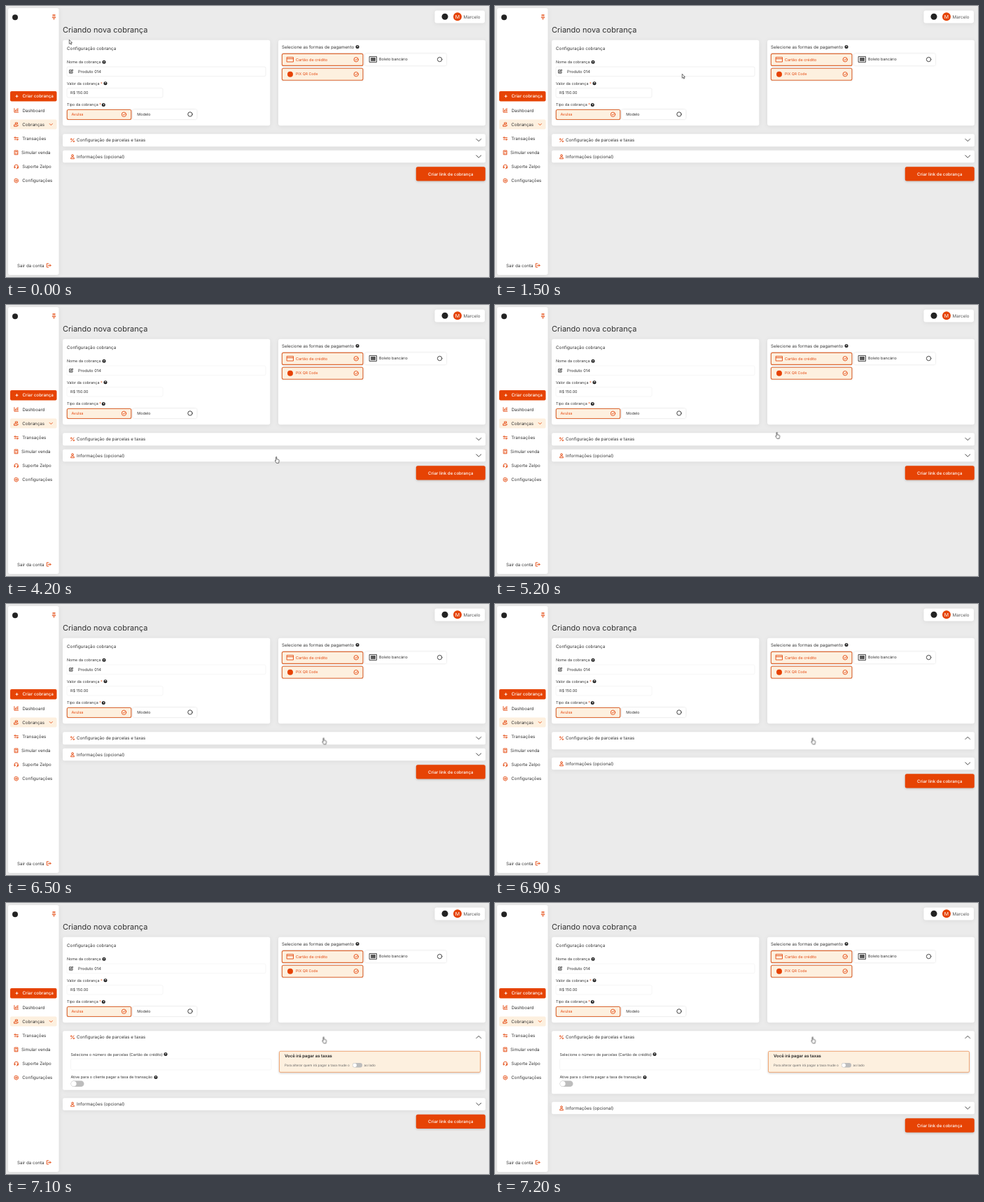
An HTML page for the animation above (8 s loop, 690 px wide and 388 px high).

```html
<!DOCTYPE html>
<html lang="pt-BR">
<head>
<meta charset="utf-8">
<title>Criando nova cobrança</title>
<style>
  html, body { margin: 0; width: 100%; height: 100%; overflow: hidden; background: #ebebeb; }
  svg { display: block; width: 690px; height: 388px; }
  text { font-family: Inter, "Open Sans", sans-serif; text-rendering: geometricPrecision; white-space: pre; }
  .card { fill: #fff; filter: drop-shadow(0 1px 3px rgba(0, 0, 0, .07)); }
  .field { fill: #fff; stroke: #ececec; stroke-width: .8; }
  .option { fill: #fff; filter: drop-shadow(0 .5px 1px rgba(0, 0, 0, .16)); }
  .picked { fill: #fdf0df; stroke: #df6a35; stroke-width: 1.1; filter: drop-shadow(0 .5px 1px rgba(0, 0, 0, .14)); }
  .line { fill: none; stroke: #e5490f; stroke-width: .9; stroke-linecap: round; stroke-linejoin: round; }
  .dark { stroke: #333; }
  .solid { fill: #e64304; }
  .button { filter: drop-shadow(0 1px 1.5px rgba(0, 0, 0, .2)); }
  .arrow path, .hand path { fill: #fff; stroke: #333; stroke-width: .7; stroke-linejoin: round; }
  .fade { animation: fade 8s step-end infinite; }
  .grow { animation: grow 8s step-end infinite; }
  .push { animation: push 8s step-end infinite; }
  .shut { animation: shut 8s step-end infinite; }
  .open { animation: open 8s step-end infinite; }
  .cursor { animation: cursor 8s step-end infinite; }
  .arrow { animation: arrow 8s step-end infinite; }
  .hand { animation: hand 8s step-end infinite; }
</style>
</head>
<body>
<script>
const LOOP = 8000, INK = '#333', ORANGE = '#e5490f';

// Each step is [start in ms, declarations], held until the next one.
const frames = (name, steps) =>
  `@keyframes ${name} {${steps.map(([ms, css]) => `${ms / LOOP * 100}% {${css}}`).join(' ')}}`;

// y is the middle of the capitals.
const text = (x, y, size, str, fill = INK, weight = 400) =>
  `<text x="${x}" y="${y + size * .36}" font-size="${size}" fill="${fill}" font-weight="${weight}">${str}</text>`;
const box = (cls, x, y, w, h, r = 2) =>
  `<rect class="${cls}" x="${x}" y="${y}" width="${w}" height="${h}" rx="${r}"/>`;
const line = (d, cls = '') => `<path class="line ${cls}" d="${d}"/>`;
const at = (x, y, body) => `<g transform="translate(${x} ${y})">${body}</g>`;
const dot = (x, y, r, fill) => `<circle cx="${x}" cy="${y}" r="${r}" fill="${fill}"/>`;
const ring = (x, y, r, cls = '') => `<circle class="line ${cls}" cx="${x}" cy="${y}" r="${r}"/>`;
const help = (x, y) => dot(x, y, 2.5, '#222') +
  `<text x="${x}" y="${y + 1.5}" font-size="4.2" font-weight="700" fill="#fff" text-anchor="middle">?</text>`;
const check = (x, y) => ring(x, y, 3.2) + at(x, y, line('M-1.4 0 L-.3 1.1 L1.5 -1'));
const label = (x, y, str, star = '') => text(x, y, 5.4, `${str}${star && `<tspan fill="${ORANGE}"> *</tspan>`}`);
const chevron = (x, y, dir, cls) => at(x, y, line(`M-3.4 ${-1.6 * dir} L0 ${1.6 * dir} L3.4 ${-1.6 * dir}`, cls));
const toggle = (x, y, w, h) => `<rect x="${x}" y="${y}" width="${w}" height="${h}" rx="${h / 2}" fill="#bdbdbd"/>` +
  dot(x + h / 2, y + h / 2, h / 2 - .5, '#fff');

const icons = {
  chart: 'M-2.8 -2.8 V2.8 H2.8 M-1.2 1.3 V-.3 M.5 1.3 V-1.8 M2.2 1.3 V-2.8',
  hand: 'M-2.8 .5 H-.5 L.8 1.4 H2.8 L1 2.8 H-2.8 Z M-1 -2.5 H1.8 V-.6 H-1 Z',
  swap: 'M-2.6 -1.3 H2.6 M-1.4 -2.5 L-2.6 -1.3 L-1.4 -.1 M2.6 1.4 H-2.6 M1.4 .2 L2.6 1.4 L1.4 2.6',
  calc: 'M-2.2 -2.9 H2.2 V2.9 H-2.2 Z M-1.1 -1.5 H1.1 M-1.1 .3 H-1 M1 .3 H1.1 M-1.1 1.6 H-1 M1 1.6 H1.1',
  phones: 'M-2.6 1.6 V-.2 A2.6 2.6 0 0 1 2.6 -.2 V1.6 M-2.6 .1 H-1.6 V1.8 H-2.6 M2.6 .1 H1.6 V1.8 H2.6 M2.6 1.8 L.4 2.9',
  gear: 'M0 -3 L2.6 -1.5 V1.5 L0 3 L-2.6 1.5 V-1.5 Z M1.1 0 A1.1 1.1 0 1 1 -1.1 0 A1.1 1.1 0 1 1 1.1 0',
  pin: 'M-1.6 -3.2 H1.6 M-1.1 -3.2 V-.8 L-2.4 .8 H2.4 L1.1 -.8 V-3.2 M0 .8 V3.4',
  exit: 'M-.4 -2.6 H-2.8 V2.6 H-.4 M-1 0 H3 M1.5 -1.6 L3 0 L1.5 1.6',
  percent: 'M-2 2.3 L2 -2.3 M-1 -1.6 A.8 .8 0 1 1 -2.6 -1.6 A.8 .8 0 1 1 -1 -1.6 M2.6 1.6 A.8 .8 0 1 1 1 1.6 A.8 .8 0 1 1 2.6 1.6',
  person: 'M1.4 -1.4 A1.4 1.4 0 1 1 -1.4 -1.4 A1.4 1.4 0 1 1 1.4 -1.4 M-2.5 2.8 A2.5 2.3 0 0 1 2.5 2.8 Z',
  edit: 'M.2 -2 H-2.4 V2.4 H2 V.2 M-.8 .9 L-.5 -.4 L2 -2.7 L2.8 -1.9 L.4 .6 Z',
  plus: 'M-2 0 H2 M0 -2 V2'
};
const icon = (name, x, y, cls) => at(x, y, line(icons[name], cls));

const menu = [
  ['chart', 'Dashboard', 23.5], ['hand', 'Cobranças', 23.3], ['swap', 'Transações', 23.3],
  ['calc', 'Simular venda', 22], ['phones', 'Suporte Zelpo', 23.3], ['gear', 'Configurações', 23.3]
];

const sidebar = box('card', 3, 3, 72.5, 382, 3) +
  dot(13, 16.3, 4, '#222') + icon('pin', 68.5, 16) +
  box('solid', 6, 122, 66.5, 14.5) + at(15.5, 129.2, `<path d="${icons.plus}" stroke="#fff" stroke-width=".9"/>`) +
  text(23.5, 129.2, 6.25, 'Criar cobrança', '#fff', 500) +
  `<rect x="6" y="162.5" width="66.5" height="14" rx="2" fill="#fdf0df"/>` +
  menu.map(([name, str, x], i) => icon(name, 14.7, 149.4 + i * 20.15) + text(x, 149.4 + i * 20.15, 6.2, str)).join('') +
  at(64.3, 169.6, line('M-2 -1 L0 1 L2 -1')) +
  text(16, 371.4, 6.2, 'Sair da conta') + icon('exit', 61, 371.4);

const header = box('card', 612.5, 6.5, 71.5, 18, 3) + dot(627, 15.3, 4.5, '#222') +
  dot(645, 15.3, 6, '#e64304') +
  '<text x="645" y="17.8" font-size="7" fill="#fff" text-anchor="middle">M</text>' +
  text(653.5, 15.4, 6.3, 'Marcelo', '#555') +
  text(81, 33.6, 11, 'Criando nova cobrança');

const setup = box('card', 81, 48.7, 296.3, 122.5, 3) +
  text(87, 61, 6.3, 'Configuração cobrança') +
  label(87, 80.2, 'Nome da cobrança') + help(140, 80.2) +
  `<g class="fade">${box('field', 87, 87, 284, 13.6)}${box('field', 87, 117.6, 137, 13.4)}</g>` +
  icon('edit', 93, 93.7, 'dark') + text(103, 93.6, 5.8, 'Produto 014') +
  label(87, 111, 'Valor da cobrança', '*') + help(142, 110.8) + text(92, 124.3, 5.45, 'R$ 150.00') +
  label(87, 141.5, 'Tipo da cobrança', '*') + help(139.3, 141.4) +
  box('picked', 87.3, 148.5, 91.5, 14) + text(93.5, 155.4, 5.4, 'Avulsa', ORANGE) + check(168.5, 155.3) +
  box('option', 181, 148.3, 91.5, 13.8) + text(187.3, 155.1, 5.45, 'Modelo') + ring(263, 155, 3.2, 'dark');

const payment = box('card', 389, 48.7, 296, 122.5, 3) +
  text(394, 58.7, 6.2, 'Selecione as formas de pagamento') + help(502, 58.6) +
  box('picked', 394.4, 68.4, 115.5, 17) + text(414, 76.7, 5.5, 'Cartão de crédito', ORANGE) + check(500.2, 76.7) +
  at(406, 76.7, line('M-4.5 -3.3 H4.5 V3.3 H-4.5 Z M-4.5 -1.2 H4.5')) +
  box('option', 513, 68.3, 116, 17) + text(533, 76.4, 5.5, 'Boleto bancário') + ring(619.6, 76.5, 3.2, 'dark') +
  at(524.5, 76.4, line('M-5 -4 H5 V4 H-5 Z', 'dark') + '<rect x="-3.4" y="-2.5" width="6.8" height="5" fill="#555"/>') +
  box('picked', 394.4, 89.2, 115.5, 17) + text(414, 97.6, 5.2, 'PIX QR Code', ORANGE) + check(500.2, 97.7) +
  dot(406, 97.7, 4, '#e64304');

const fees = '<rect class="card grow" x="81" y="183.3" width="604" height="18" rx="2.5"/>' +
  icon('percent', 95, 192.2) + text(101, 192.2, 6.2, 'Configuração de parcelas e taxas') +
  chevron(675.3, 192, 1, 'dark shut') + chevron(675.3, 192, -1, 'dark open') +
  '<g clip-path="url(#body)"><g class="open">' +
  label(92.5, 216.7, 'Selecione o número de parcelas (Cartão de crédito)') + help(228, 216.6) +
  `<g opacity=".6">${box('field', 92.5, 223, 286.5, 16)}</g>` +
  label(92.5, 249.5, 'Ative para o cliente pagar a taxa de transação') + help(214, 249.4) +
  toggle(92.5, 254.4, 19, 8.6) +
  '<rect class="button" x="390.5" y="212.3" width="287" height="30" rx="1.5" fill="#fdf0df" stroke="#f0a06a" stroke-width=".9"/>' +
  text(398, 219, 6.05, 'Você irá pagar as taxas', '#222', 600) +
  text(398, 232.2, 4.7, 'Para alterar quem irá pagar a taxa mude o', '#666') +
  toggle(495, 229, 14, 6.4) + text(511.5, 232.2, 4.7, 'ao lado', '#666') +
  '</g></g>';

const info = `<g class="push">${box('card', 81, 206.8, 604, 17.5, 2.5)}` +
  icon('person', 95, 215.5) + text(101, 215.4, 6.25, 'Informações (opcional)') + chevron(675.3, 215.5, 1, 'dark') +
  box('solid button', 585.8, 230.2, 99, 20.4, 2.5) +
  text(603, 240.3, 6.15, 'Criar link de cobrança', '#fff', 500) + '</g>';

const cursor = '<g class="cursor"><g class="arrow"><path d="M.3 .3 V6.3 L1.7 5 L2.7 7.2 L3.6 6.8 L2.7 4.7 H4.5 Z"/></g>' +
  '<g class="hand"><path d="M1.6 .9 C1.6 .1 2.8 .1 2.8 .9 V3.7 L5.4 4.3 Q6.4 4.6 6.2 5.8 L5.6 9.3 H2.4 L.4 6.3 C0 5.5 .9 5.1 1.6 5.9 Z"/></g></g>';

// [ms, x, y, pointing hand]
const path = [
  [0, 90, 48], [100, 150, 75], [200, 300, 140], [300, 470, 200], [400, 590, 229, 1], [500, 626.5, 231, 1],
  [1400, 420, 160], [1500, 267, 97], [2500, 296, 112], [2900, 170, 70], [3000, 86, 45], [3200, 101, 53, 1],
  [3400, 140, 62], [3500, 260, 90], [3600, 346, 106], [3900, 350, 112], [4200, 384, 217, 1],
  [5200, 400.5, 182, 1], [5300, 403, 179.5, 1], [6000, 425, 183, 1], [6100, 443, 185, 1], [6500, 451.5, 191.5, 1]
];
// [ms, height added to the opened panel]
const opening = [[0, 0], [6900, 7], [7000, 48.3], [7100, 66.5], [7200, 72]];
const show = (on) => `opacity: ${on ? 1 : 0}`;

const style = document.createElement('style');
style.textContent = [
  frames('cursor', path.map(([ms, x, y]) => [ms, `transform: translate(${x}px, ${y}px)`])),
  frames('arrow', path.map(([ms, , , hand]) => [ms, show(!hand)])),
  frames('hand', path.map(([ms, , , hand]) => [ms, show(hand)])),
  frames('grow', opening.map(([ms, h]) => [ms, `height: ${18 + h}px`])),
  frames('push', opening.map(([ms, h]) => [ms, `transform: translateY(${h && h + 6}px)`])),
  frames('shut', [[0, show(true)], [6900, show(false)]]),
  frames('open', [[0, show(false)], [6900, show(true)]]),
  frames('fade', [[0, 'opacity: 1'], [2900, 'opacity: .6']])
].join('\n');
document.head.append(style);

document.body.innerHTML = '<svg viewBox="0 0 690 388">' +
  '<clipPath id="body"><rect class="grow" x="81" y="183.3" width="604" height="18"/></clipPath>' +
  sidebar + header + setup + payment + fees + info + cursor + '</svg>';
</script>
</body>
</html>
```
